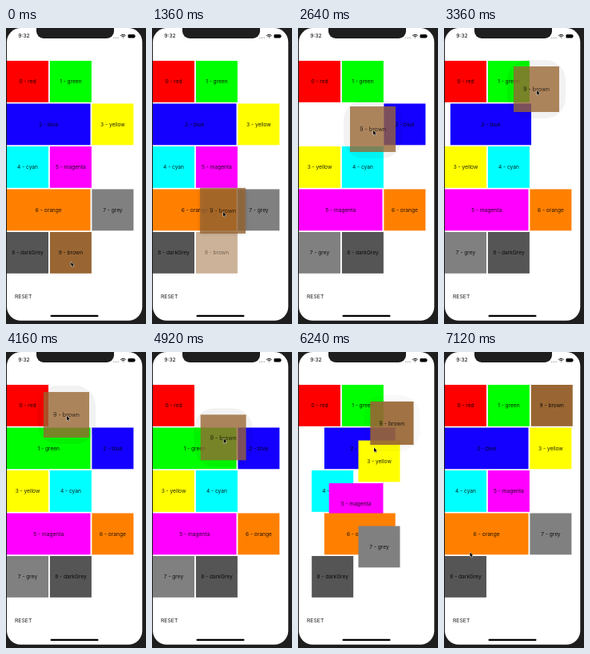
Recreate the animation shown at these times as an HTML page with a canvas. Size 175 px wide and 370 px high, loop 7160 ms.

```html
<!DOCTYPE html>
<html lang="en">
<head>
<meta charset="utf-8">
<title>Reordering cells</title>
<style>
html, body { margin: 0; width: 100%; height: 100%; overflow: hidden; background: #1e1e1e; }
canvas { display: block; width: 175px; height: 370px; filter: blur(0.4px); }
</style>
</head>
<body>
<canvas id="stage"></canvas>
<script>
const LOOP = 7160, MOVE = 300, LIFT = 480, DROP = 6050, DROP_TIME = 350;
const SIZE = 52, WIDE = 104.5, HEIGHT = 51.8, GAP = 1.9, PITCH = 53.5, TOP = 41;
const FONT = 'Inter, "Liberation Sans", sans-serif';
const BEZEL = '#1e1e1e';
const cells = [
  ['red', '#f00'], ['green', '#0f0'], ['blue', '#1400ff'], ['yellow', '#ff0'],
  ['cyan', '#0ff'], ['magenta', '#f0f'], ['orange', '#ff8000'], ['grey', '#808080'],
  ['darkGrey', '#555'], ['brown', '#996633']
].map(([name, color], i) => ({ label: `${i} - ${name}`, color }));
const BROWN = cells.length - 1;

const canvas = document.getElementById('stage');
const ctx = canvas.getContext('2d');
const dpr = window.devicePixelRatio || 1;
canvas.width = 175 * dpr;
canvas.height = 370 * dpr;

const lerp = (a, b, p) => a + (b - a) * p;
const blend = (from, to, p) => from.map((v, k) => lerp(v, to[k], p));

function ramp(t, start, length) {
  const p = Math.max(0, Math.min(1, (t - start) / length));
  return p * p * (3 - 2 * p);
}

// Rows fill from the left; while dragging, width follows the slot, otherwise the cell.
function layout(slot, bySlot) {
  const order = [...cells.keys()].filter(i => i !== BROWN);
  order.splice(slot, 0, BROWN);
  const rects = [];
  let x = 1, y = TOP;
  order.forEach((cell, index) => {
    const w = (bySlot ? index : cell) % 4 === 2 ? WIDE : SIZE;
    if (x + w > 164) { x = 1; y += PITCH; }
    rects[cell] = [x, y, w];
    x += w + GAP;
  });
  return rects;
}

const center = ([x, y, w]) => [x + w / 2, y + HEIGHT / 2];
const before = layout(BROWN, false);
const after = layout(2, false);

// Each leg of the drag ends over a slot.
const legs = [
  { start: 920, end: 1360, to: [88.5, 228.5], slot: 9 },
  { start: 1360, end: 1800, to: [91, 190], slot: 6 },
  { start: 1800, end: 2500, to: [93.5, 126.5], slot: 2 },
  { start: 2640, end: 3360, to: [115.5, 76.5], slot: 3 },
  { start: 3360, end: 4000, to: [75.5, 78.5], slot: 1 },
  { start: 4480, end: 5160, to: [94.5, 118], slot: 2 }
];

// The other cells make room about two thirds into a leg.
const moves = legs.map(({ start, end, slot }) => ({
  time: lerp(start, end, 0.65), rects: layout(slot, true)
}));
moves.push({ time: DROP, rects: after });
const firstShift = moves[1].time;

const cellRect = (i, t) => moves.reduce(
  (rect, { time, rects }) => blend(rect, rects[i], ramp(t, time, MOVE)), before[i]);

const dragPoint = t => legs.reduce(
  (point, { start, end, to }) => blend(point, to, ramp(t, start, end - start)),
  center(before[BROWN]));

function cursorPoint(t) {
  const [x, y] = dragPoint(t);
  const grab = 10 * (1 - ramp(t, legs[0].start, 440));
  return blend([x + 0.5, y + 1.5 + grab], [32.5, 250.5], ramp(t, DROP + 250, 820));
}

function text(label, x, y, size, align = 'center', weight = 400) {
  ctx.font = `${weight} ${size}px ${FONT}`;
  ctx.textAlign = align;
  ctx.textBaseline = 'middle';
  ctx.fillStyle = 'rgba(0,0,0,0.88)';
  ctx.fillText(label, x, y);
}

function roundRect(x, y, w, h, r, color) {
  ctx.beginPath();
  ctx.roundRect(x, y, w, h, r);
  ctx.fillStyle = color;
  ctx.fill();
}

function drawCell(i, [x, y, w], alpha = 1) {
  ctx.globalAlpha = alpha;
  ctx.fillStyle = cells[i].color;
  ctx.fillRect(x, y, w, HEIGHT);
  text(cells[i].label, x + w / 2, y + HEIGHT / 2 + 0.4, 6.6);
  ctx.globalAlpha = 1;
}

function drawLifted(t) {
  const dropped = ramp(t, DROP, DROP_TIME);
  const [x, y] = blend(dragPoint(t), center(after[BROWN]), dropped);
  const lift = ramp(t, LIFT, 350) * (1 - dropped);
  const side = lerp(SIZE, 57, lift);
  const halo = ramp(t, legs[1].start, 500) * (1 - dropped);
  const reach = side / 2 + 8;
  roundRect(x - reach, y - reach, reach * 2, reach * 2, 25, `rgba(0,0,0,${0.05 * halo})`);

  ctx.save();
  ctx.globalAlpha = lerp(1, 0.78, lift);
  ctx.shadowColor = `rgba(0,0,0,${0.25 * lift * (1 - halo)})`;
  ctx.shadowBlur = 5 * dpr;
  ctx.fillStyle = cells[BROWN].color;
  ctx.fillRect(x - side / 2, y - side / 2, side, side);
  ctx.shadowColor = 'transparent';
  text(cells[BROWN].label, x, y + 0.6, 6.6 * side / SIZE);
  ctx.restore();
}

function drawStatusBar() {
  roundRect(38, -10, 97, 23, 9, BEZEL);
  text('9:32', 22.5, 10.3, 6.6, 'center', 500);
  ctx.fillStyle = '#888';
  for (let i = 0; i < 4; i++) ctx.fillRect(134 + i * 2, 11.8, 1, 1);

  ctx.strokeStyle = '#000';
  ctx.lineWidth = 1;
  for (const r of [0.6, 2.5, 4.3]) {
    ctx.beginPath();
    ctx.arc(146.4, 12.6, r, -Math.PI * 0.77, -Math.PI * 0.23);
    ctx.stroke();
  }
  roundRect(152.5, 8, 8.5, 4.4, 1.2, '#000');
  ctx.fillRect(161.4, 9.4, 0.7, 1.6);
}

function drawCursor(t) {
  ctx.save();
  ctx.translate(...cursorPoint(t));
  const arrow = new Path2D('M0 0V5.4L1.3 4.3 2.1 6.2 3 5.8 2.2 4 3.8 3.8Z');
  ctx.lineWidth = 0.8;
  ctx.strokeStyle = '#fff';
  ctx.stroke(arrow);
  ctx.fillStyle = '#000';
  ctx.fill(arrow);
  ctx.restore();
}

function draw(t) {
  ctx.setTransform(dpr, 0, 0, dpr, 0, 0);
  ctx.fillStyle = BEZEL;
  ctx.fillRect(0, 0, 175, 370);
  roundRect(1, 0, 169.3, 365.8, 17.5, '#fff');
  drawStatusBar();

  for (let i = 0; i < BROWN; i++) drawCell(i, cellRect(i, t));
  if (t < LIFT) {
    drawCell(BROWN, before[BROWN]);
  } else if (t > DROP + DROP_TIME) {
    drawCell(BROWN, after[BROWN]);
  } else {
    drawCell(BROWN, before[BROWN], 0.5 * (1 - ramp(t, firstShift, MOVE)));
    drawLifted(t);
  }

  text('RESET', 11, 335.5, 6.8, 'left');
  roundRect(55.5, 358.8, 60, 2.2, 1.1, '#000');
  drawCursor(t);
}

function frame() {
  draw(performance.now() % LOOP);
  requestAnimationFrame(frame);
}
frame();
</script>
</body>
</html>
```
